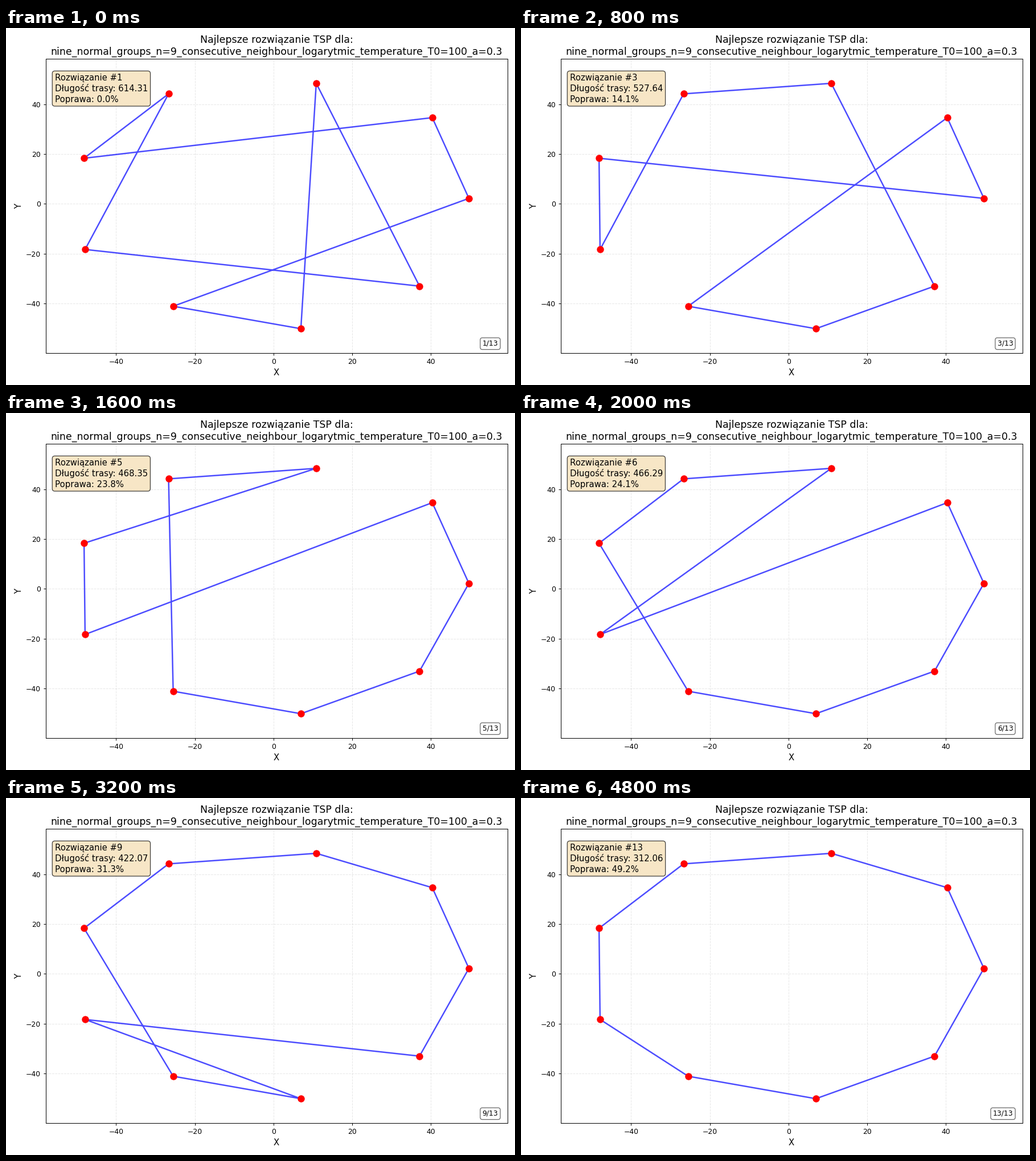
A matplotlib script that plays this animation: 894x626 px, repeating every 5.2 s.

```python
import matplotlib.pyplot as plt
from matplotlib.animation import FuncAnimation

W, H, DPI = 894, 626, 89.4
TITLE = ("Najlepsze rozwiązanie TSP dla:\n"
         "nine_normal_groups_n=9_consecutive_neighbour_"
         "logarytmic_temperature_T0=100_a=0.3")

CITIES = {
    "A": (-26.67, 44.13), "B": (-48.16, 18.30), "C": (-47.90, -18.29),
    "D": (-25.50, -41.07), "E": (6.96, -50.08), "F": (37.13, -33.00),
    "G": (49.68, 2.20), "H": (40.37, 34.58), "I": (10.87, 48.35),
}

# Visiting order and length of each successive best tour
TOURS = [
    ("ABHGDEIFC", 614.31),
    ("ABHGDEFIC", 553.01),
    ("AIFEDHGBC", 527.64),
    ("AIBCHGFDE", 511.65),
    ("AIBCHGFED", 468.35),
    ("AICHGFEDB", 466.29),
    ("AIHGCEFDB", 462.21),
    ("AIHGCFEDB", 455.63),
    ("AIHGFCEDB", 422.07),
    ("AIHGFCDEB", 414.90),
    ("AIHGFDECB", 371.99),
    ("AIHGFEDCB", 312.06),
    ("AIHGFEDCB", 312.06),
]


def limits(values, margin=0.1):
    lo, hi = min(values), max(values)
    pad = margin * (hi - lo)
    return lo - pad, hi + pad


def rounded(color, alpha):
    return dict(boxstyle="round", facecolor=color, alpha=alpha)


plt.rcParams["font.family"] = "DejaVu Sans"
fig, ax = plt.subplots(figsize=((W + 1e-6) / DPI, (H + 1e-6) / DPI), dpi=DPI)
fig.subplots_adjust(left=69.5 / W, right=880.6 / W,
                    top=1 - 54 / H, bottom=1 - 570.3 / H)

xs, ys = zip(*CITIES.values())
ticks = range(-40, 41, 20)
ax.set(xlim=limits(xs), ylim=limits(ys), xticks=ticks, yticks=ticks)
ax.set_title(TITLE, fontsize=14)
ax.set_xlabel("X", fontsize=12)
ax.set_ylabel("Y", fontsize=12)
ax.grid(True, linestyle="--", alpha=0.3)

route, = ax.plot([], [], "b-", linewidth=2, alpha=0.7)
ax.plot(xs, ys, "ro", markersize=9)
info = ax.text(0.02, 0.95, "", transform=ax.transAxes, fontsize=12,
               va="top", linespacing=1.27, bbox=rounded("wheat", 0.75))
badge = ax.text(0.98, 0.02, "", transform=ax.transAxes, fontsize=10,
                ha="right", va="bottom", bbox=rounded("white", 0.6))


def draw(i):
    order, length = TOURS[i]
    first = TOURS[0][1]
    gain = 100 * (first - length) / first
    route.set_data(*zip(*(CITIES[c] for c in order + order[0])))
    info.set_text(f"Rozwiązanie #{i + 1}\n"
                  f"Długość trasy: {length:.2f}\n"
                  f"Poprawa: {gain:.1f}%")
    badge.set_text(f"{i + 1}/{len(TOURS)}")
    return route, info, badge


anim = FuncAnimation(fig, draw, frames=len(TOURS), interval=400,
                     repeat=True, repeat_delay=0)
plt.show()
```
